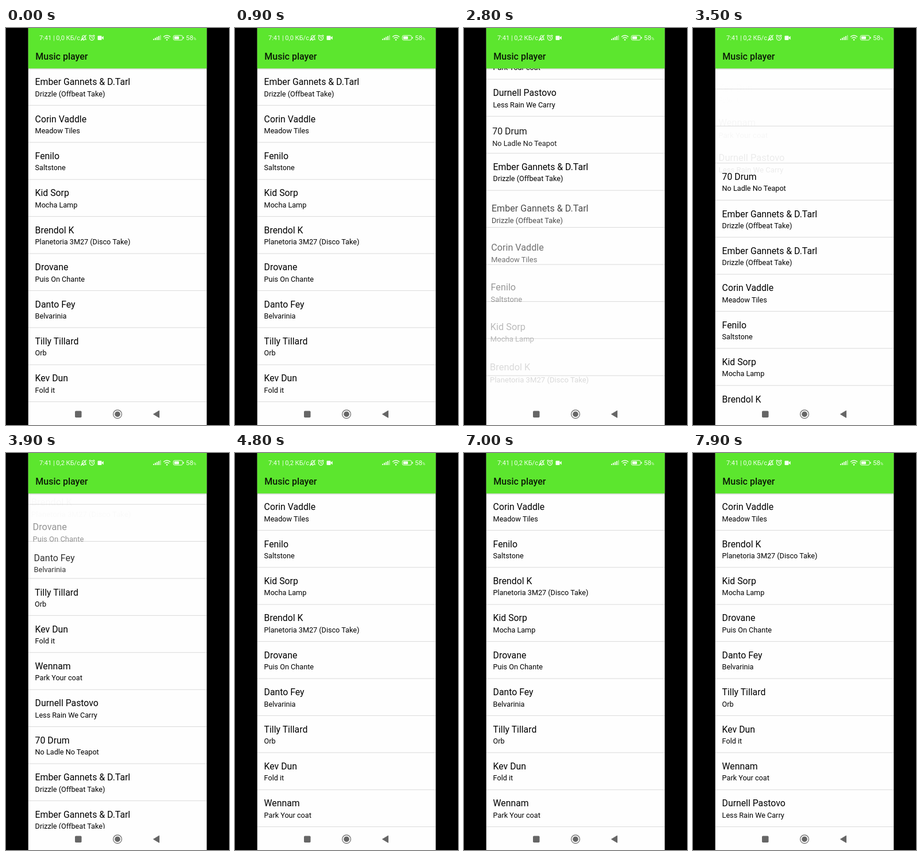
Recreate the animation shown at these times as an HTML page. Size 388 by 690 pixels, loop 8000 ms.

```html
<!DOCTYPE html>
<html lang="en">
<head>
<meta charset="utf-8">
<title>Music player</title>
<style>
  html, body { margin: 0; width: 100%; height: 100%; overflow: hidden; background: #000; }
  svg { display: block; width: 100%; height: 100%; font-family: Roboto, sans-serif; }
  .title { font-size: 15.8px; fill: #000; }
  .sub { font-size: 12.65px; fill: #000; }
  .rule { stroke: #dadada; stroke-width: 1; }
  .line { fill: none; stroke: #f4fff0; stroke-width: 1.2; }
  .fill { fill: #f4fff0; }
</style>
</head>
<body>
<svg viewBox="0 0 388 690">
  <defs>
    <clipPath id="view"><rect x="38.75" y="70" width="310.5" height="583"/></clipPath>
    <linearGradient id="shade" x2="0" y2="1">
      <stop offset="0" stop-color="#000" stop-opacity=".2"/>
      <stop offset="1" stop-color="#000" stop-opacity="0"/>
    </linearGradient>
  </defs>
  <rect width="388" height="690" fill="#000"/>
  <rect x="38.75" width="310.5" height="690" fill="#fefefe"/>
  <g id="list" clip-path="url(#view)"></g>
  <rect x="38.75" y="70" width="310.5" height="3" fill="url(#shade)"/>
  <rect x="38.75" width="310.5" height="70.3" fill="#5ce62e"/>
  <text x="51.3" y="54.7" font-size="16" font-weight="500" fill="#0b1a06">Music player</text>

  <g class="fill" font-size="11">
    <text id="net" x="58" y="21"></text>
    <text x="313" y="21" font-size="11.5">58<tspan font-size="6.5">%</tspan></text>
    <path d="M134 20.800h2.400a1.200 1.200 0 0 1-2.400 0z"/>
    <rect x="159.500" y="13.500" width="7" height="7.500" rx="1"/>
    <path d="M166 17l3.700-3v6.500z"/>
    <path d="M256 21v-2.200h1.800V21zM259 21v-4h1.800v4zM262 21v-5.500h1.800V21zM265 21v-7h1.800v7z"/>
    <path d="M268 21v-8.500h1.500V21z" opacity=".6"/>
    <circle cx="280" cy="20.500" r="1.300"/>
    <rect x="292.800" y="14.600" width="8.200" height="4.800" rx="1"/>
    <rect x="308" y="15.400" width="1.500" height="3.200" rx=".7"/>
  </g>
  <g class="line">
    <path d="M131.500 19.800h7.600c-1-1-1.200-2-1.200-3.800a2.600 3 0 0 0-5.200 0c0 1.800-.2 2.800-1.200 3.800zM130.300 22l9.500-9.800"/>
    <circle cx="149.500" cy="17.300" r="4"/>
    <path d="M149.500 15v2.500l1.800 1M144.500 14l2.300-2M154.500 14l-2.300-2"/>
    <path d="M274 15.500a8.500 8.500 0 0 1 12 0M276.200 18a5.400 5.400 0 0 1 7.600 0" stroke-width="1.500"/>
    <rect x="291.200" y="13" width="16" height="8" rx="2.200" stroke-width="1"/>
  </g>

  <g fill="#666">
    <rect x="120" y="665.500" width="11.500" height="11.500" rx="1.800"/>
    <circle cx="194" cy="671.200" r="4.800"/>
    <circle cx="194" cy="671.200" r="7.400" fill="none" stroke="#666" stroke-width="1.200"/>
    <path d="M256.500 671.200L266.500 665.200V677.200Z" stroke="#666" stroke-linejoin="round"/>
  </g>
</svg>
<script>
const LOOP = 8000, ROW = 64.4, TOP = 70, HEIGHT = 583, MID = 194;
const DROP = 2550, HELD = 11, ENTER = 400, REMOVED = 7620;

const songs = [
  ['Ember Gannets & D.Tarl', 'Drizzle (Offbeat Take)'],
  ['Corin Vaddle', 'Meadow Tiles'],
  ['Fenilo', 'Saltstone'],
  ['Kid Sorp', 'Mocha Lamp'],
  ['Brendol K', 'Planetoria 3M27 (Disco Take)'],
  ['Drovane', 'Puis On Chante'],
  ['Danto Fey', 'Belvarinia'],
  ['Tilly Tillard', 'Orb'],
  ['Kev Dun', 'Fold it'],
  ['Wennam', 'Park Your coat'],
  ['Durnell Pastovo', 'Less Rain We Carry'],
  ['70 Drum', 'No Ladle No Teapot']
];

// Tracks are [time, value] points
const scrollDown = [[2350, 0], [2550, 193], [2700, 440], [2800, 560], [2900, 620], [3000, 648], [3100, 655]];
const scrollUp = [[3380, 655], [3436, 644], [3500, 480], [3612, 386], [3724, 322],
  [3870, 258], [3900, 239], [4000, 180], [4100, 90], [4190, 0]];
const scroll = scrollDown.concat(scrollUp);
const drag = [[1880, 0], [2000, 5], [2100, 20], [2200, 45], [2300, 76], [2400, 300], [DROP, HELD * ROW]];
const nudge = [[5150, 0], [5350, 12], [5500, 45], [5620, 78], [5740, 80], [5880, ROW]];
const swipe = [[6550, 0], [6600, 15], [6700, 55], [6800, 73], [6900, 25], [6980, 0],
  [7270, 0], [7300, 25], [7400, 110], [7500, 320]];

const clamp = x => Math.max(0, Math.min(1, x));
const ramp = (t, a, b) => clamp((t - a) / (b - a));
const smooth = p => p * p * (3 - 2 * p);
const ease = (t, a, b) => smooth(ramp(t, a, b));

function at(track, t) {
  if (t <= track[0][0]) return track[0][1];
  for (let i = 1; i < track.length; i++) {
    const [t0, v0] = track[i - 1], [t1, v1] = track[i];
    if (t <= t1) return v0 + (v1 - v0) * (t - t0) / (t1 - t0);
  }
  return track[track.length - 1][1];
}

// Time at which a monotonic track crosses a value, or null
function when(track, v) {
  for (let i = 1; i < track.length; i++) {
    const [t0, v0] = track[i - 1], [t1, v1] = track[i];
    if ((v - v0) * (v - v1) <= 0 && v0 !== v1) return t0 + (t1 - t0) * (v - v0) / (v1 - v0);
  }
  return null;
}

function make(tag, attrs, parent, text) {
  const el = document.createElementNS('http://www.w3.org/2000/svg', tag);
  for (const k in attrs) el.setAttribute(k, attrs[k]);
  if (text) el.textContent = text;
  return parent.appendChild(el);
}

const list = document.getElementById('list');
const net = document.getElementById('net');

const rows = Array.from({ length: 24 }, (_, i) => {
  const song = songs[i < HELD ? i + 1 : Math.max(0, i - 12)];
  const rule = make('line', { class: 'rule', x1: 38.75, x2: 349.25 }, list);
  const body = make('g', {}, list);
  make('text', { class: 'title', x: 50.6, y: 29.3 }, body, song[0]);
  make('text', { class: 'sub', x: 50.6, y: 48.6 }, body, song[1]);
  const first = i < HELD ? i + 1 : i;
  return {
    rule, body,
    passed: when(drag, (i + 1) * ROW + 12) || DROP,
    below: i === HELD ? null : when(scrollDown, first * ROW - HEIGHT),
    above: when(scrollUp, (i + 1) * ROW)
  };
});
// The dragged row lies on top
list.append(rows[HELD].rule, rows[HELD].body);

function contentY(i, t) {
  let y = i === HELD ? at(drag, t) : i * ROW;
  if (i < HELD) y += ROW * (1 - ease(t, rows[i].passed, rows[i].passed + 150));
  if (i === 2) y += at(nudge, t);
  if (i === 3) y -= ROW * ease(t, 5610, 5800);
  if (i > 1) y -= ROW * ease(t, REMOVED, REMOVED + 250);
  return y;
}

function entry(row, t) {
  const start = row.above !== null && t >= row.above ? row.above : row.below;
  return start === null ? 1 : ramp(t, start, start + ENTER);
}

function render(t) {
  const s = at(scroll, t);
  rows.forEach((row, i) => {
    const y = TOP + contentY(i, t) - s;
    const hidden = y > TOP + HEIGHT || y < TOP - 1.5 * ROW || (i === 1 && t > REMOVED);
    row.rule.style.display = row.body.style.display = hidden ? 'none' : '';
    if (hidden) return;

    const shown = entry(row, t), rest = 1 - shown;
    let held = 0, dx = 0;
    if (i === HELD) held = ramp(t, 1880, 2050) * (1 - ramp(t, DROP - 40, DROP + 80));
    if (i === 2) held = ramp(t, 5150, 5300) * (1 - ramp(t, 5740, 5880));
    if (i === 1) dx = at(swipe, t);

    const scale = (1 + 0.05 * rest) * (1 - 0.1 * held);
    const lift = 42 * Math.pow(rest, 1.7);
    const alpha = smooth(shown) * (1 - 0.5 * held) * clamp(1 - dx / 310);
    row.body.setAttribute('transform',
      `translate(${MID + dx} ${y + lift + ROW / 2}) scale(${scale}) translate(${-MID} ${-ROW / 2})`);
    row.body.setAttribute('opacity', alpha);
    row.rule.setAttribute('y1', y + ROW);
    row.rule.setAttribute('y2', y + ROW);
  });
  net.textContent = `7:41 | 0,${t >= 2750 && t < 7350 ? 2 : 0} КБ/с`;
}

const begin = performance.now();
function tick() {
  render((performance.now() - begin) % LOOP);
  requestAnimationFrame(tick);
}
render(0);
requestAnimationFrame(tick);
</script>
</body>
</html>
```
